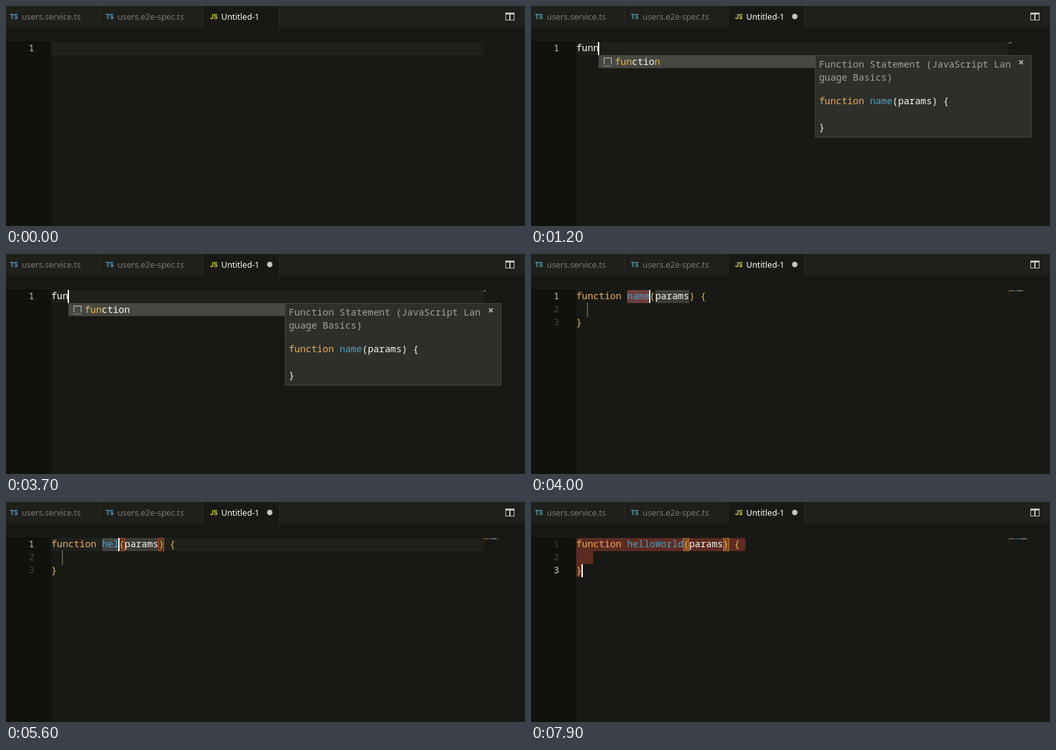
An HTML page with a canvas for the animation above (8 s loop, 791 px wide and 336 px high).

```html
<!DOCTYPE html>
<html lang="en">
<head>
<meta charset="utf-8">
<title>Editor</title>
<style>
  html, body { margin: 0; width: 100%; height: 100%; overflow: hidden; background: #181914; }
  canvas { display: block; width: 791px; height: 336px; }
</style>
</head>
<body>
<canvas id="stage" width="791" height="336"></canvas>
<script>
const ctx = document.getElementById('stage').getContext('2d', { alpha: false });
const LOOP = 8000, LEFT = 69, TOP = 55, CELL = 8.6, ROW = 20;
const CODE_FONT = '14.33px "Noto Sans Mono", monospace';
const TAB_FONT = '12.5px "Noto Sans", "Open Sans", sans-serif';
const ICON_FONT = 'bold 10px Roboto, sans-serif';
const C = {
  editor: '#181914', gutter: '#11120e', tab: '#1f201b', edge: '#2b2c27', line: '#1f201b',
  white: '#f8f8f2', keyword: '#edae51', name: '#4aa3c8', bracket: '#e6c648',
  selection: '#5c2b21', mark: '#3c3d38', guide: '#55564f', icon: '#c5c5c0'
};

// Typed text before the snippet is accepted, then the function name after it.
const prefixes = [[0, ''], [700, 'f'], [1000, 'fu'], [1100, 'fun'], [1200, 'funn'], [1700, 'fun']];
const names = [[4000, 'name'], [5400, 'h'], [5500, 'he'], [5600, 'hel'], [5700, 'hell'], [5900, 'hello'],
  [6500, 'helloW'], [6600, 'helloWo'], [6800, 'helloWor'], [6900, 'helloWorld']];
const POPUP_AT = 1100, ACCEPT_AT = 4000, RENAME_AT = 5400, SELECT_AT = 7900;

const latest = (steps, t) => steps.filter(step => step[0] <= t).pop();
const colX = col => LEFT + col * CELL;
const rowY = row => TOP + row * ROW;

function rect(x, y, w, h, color) {
  ctx.fillStyle = color;
  ctx.fillRect(x, y, w, h);
}

function rounded(x, y, w, h, color, radius = 3) {
  ctx.fillStyle = color;
  ctx.beginPath();
  ctx.roundRect(x, y, w, h, radius);
  ctx.fill();
}

function frame(x, y, w, h, color) {
  ctx.strokeStyle = color;
  ctx.lineWidth = 1;
  ctx.strokeRect(x + 0.5, y + 0.5, w - 1, h - 1);
}

function text(str, x, y, color, font = CODE_FONT) {
  ctx.font = font;
  ctx.fillStyle = color;
  ctx.fillText(str, x, y);
}

// Draws [text, color] pairs one after another on the character grid.
function tokens(list, x, y) {
  for (const [str, color] of list) {
    text(str, x, y, color);
    x += str.length * CELL;
  }
}

function tab(x, w, kind, title, active) {
  rect(x, 0, w, 33, active ? C.editor : C.tab);
  rect(x + w - 1, 0, 1, 33, C.edge);
  text(kind, x + (active ? 10 : x ? 9 : 6), 20, kind === 'JS' ? '#cbcb41' : '#519aba', ICON_FONT);
  text(title, x + (active ? 27 : x ? 27 : 24), 21, active ? '#ffffff' : '#7b7c76', TAB_FONT);
}

function chrome(dirty) {
  rect(0, 0, 791, 336, C.editor);
  rect(0, 0, 791, 33, C.tab);
  tab(0, 143, 'TS', 'users.service.ts', false);
  tab(143, 158, 'TS', 'users.e2e-spec.ts', false);
  tab(301, 116, 'JS', 'Untitled-1', true);
  if (dirty) {
    ctx.fillStyle = C.icon;
    ctx.beginPath();
    ctx.arc(402, 16, 4.2, 0, Math.PI * 2);
    ctx.fill();
  }
  frame(761, 10, 14, 12, C.icon);
  rect(761, 10, 14, 3, C.icon);
  rect(767, 10, 2, 12, C.icon);
  rect(0, 54, LEFT, 282, C.gutter);
}

function lineNumbers(count, active) {
  for (let i = 0; i < count; i++) {
    text(String(i + 1), 34.5, rowY(i) + 14, i === active ? '#c2c2bf' : '#43443e');
  }
}

function cursor(col, row = 0) {
  rect(Math.max(LEFT, Math.round(colX(col)) - 1), rowY(row), 2, ROW, '#ffffff');
}

function minimap(list) {
  let x = 728;
  ctx.globalAlpha = 0.5;
  for (const [str, color] of list) {
    for (const ch of str) {
      if (ch !== ' ') rect(x, 55.5, 1, 1.5, color);
      x++;
    }
  }
  ctx.globalAlpha = 1;
}

function popup(prefix) {
  const x = Math.round(colX(prefix.length));
  rect(x, 75, 330, 20, '#474841');
  rect(x, 94, 330, 1, '#41423c');
  frame(x + 8, 79, 12, 11, C.icon);
  rect(x + 8, 89, 12, 1, '#474841');
  for (let i = 0; i < 12; i += 2) rect(x + 8 + i, 91, 1, 1, C.icon);
  const hit = '#edb943';
  const tail = prefix === 'funn' ? [['ctio', C.white], ['n', hit]] : [['ction', C.white]];
  const head = prefix.slice(0, 3);
  tokens([[head, hit], ['function'.slice(head.length, 3), C.white], ...tail], x + 25, 90);

  const dx = x + 330, tx = dx + 6;
  rect(dx, 75, 330, 126, '#2e2f2a');
  frame(dx, 75, 330, 126, '#454640');
  text('Function Statement (JavaScript Lan', tx, 94, '#a3a49d');
  text('guage Basics)', tx, 114, '#a3a49d');
  tokens([['function ', C.keyword], ['name', C.name], ['(params) {', C.white]], tx, 150);
  text('}', tx, 190, C.white);
  ctx.strokeStyle = C.icon;
  ctx.lineWidth = 1.6;
  ctx.beginPath();
  ctx.moveTo(dx + 311, 83);
  ctx.lineTo(dx + 317, 89);
  ctx.moveTo(dx + 317, 83);
  ctx.lineTo(dx + 311, 89);
  ctx.stroke();
}

function bracketBox(col, selected) {
  const x = Math.round(colX(col));
  rect(x, TOP, 9, ROW, selected ? '#84451f' : '#55351a');
  frame(x, TOP, 9, ROW, selected ? '#bd7830' : '#c54d31');
}

function drawTyping(t) {
  const [since, prefix] = latest(prefixes, t);
  rect(LEFT, TOP, 659, ROW, C.line);
  lineNumbers(1, 0);
  text(prefix, LEFT, rowY(0) + 14, C.white);
  minimap([[prefix, C.white]]);
  if (t >= POPUP_AT) popup(prefix);
  if (t >= 200 && Math.floor((t - since) / 500) % 2 === 0 || prefix && t < 1700) cursor(prefix.length);
}

function drawFunction(t) {
  const [since, name] = latest(names, t);
  const renaming = t >= RENAME_AT, selected = t >= SELECT_AT;
  const nameEnd = 9 + name.length, paramsEnd = nameEnd + 7;
  const code = [['function ', C.keyword], [name, C.name], ['(', C.bracket],
    ['params', C.white], [') {', C.bracket]];

  if (selected) {
    rounded(LEFT, TOP, (paramsEnd + 4) * CELL, ROW, C.selection, [3, 3, 3, 0]);
    rounded(LEFT, rowY(1), 3 * CELL, ROW, C.selection, [0, 0, 3, 0]);
    rounded(LEFT, rowY(2), CELL, ROW, C.selection, [0, 0, 3, 3]);
  } else {
    if (renaming) rect(LEFT, TOP, 659, ROW, C.line);
    rounded(colX(9), TOP, name.length * CELL, ROW, renaming ? '#41433f' : '#6b403a', renaming ? 0 : 3);
    rect(colX(nameEnd + 1), TOP, 6 * CELL, ROW, C.mark);
    rect(85, 74, 2, 22, C.guide);
  }
  if (renaming) {
    bracketBox(nameEnd, selected);
    bracketBox(paramsEnd, selected);
  }
  lineNumbers(3, selected ? 2 : 0);
  tokens(code, LEFT, rowY(0) + 14);
  text('}', LEFT, rowY(2) + 14, C.bracket);
  minimap(code);
  rect(728, 60, 1, 1, '#7d6e34');

  if (selected) cursor(1, 2);
  else if (Math.floor((t - since) / 500) % 2 === 0) cursor(nameEnd);
}

function draw(now) {
  const t = now % LOOP;
  chrome(t >= 700);
  if (t < ACCEPT_AT) drawTyping(t);
  else drawFunction(t);
  requestAnimationFrame(draw);
}
requestAnimationFrame(draw);
</script>
</body>
</html>
```
